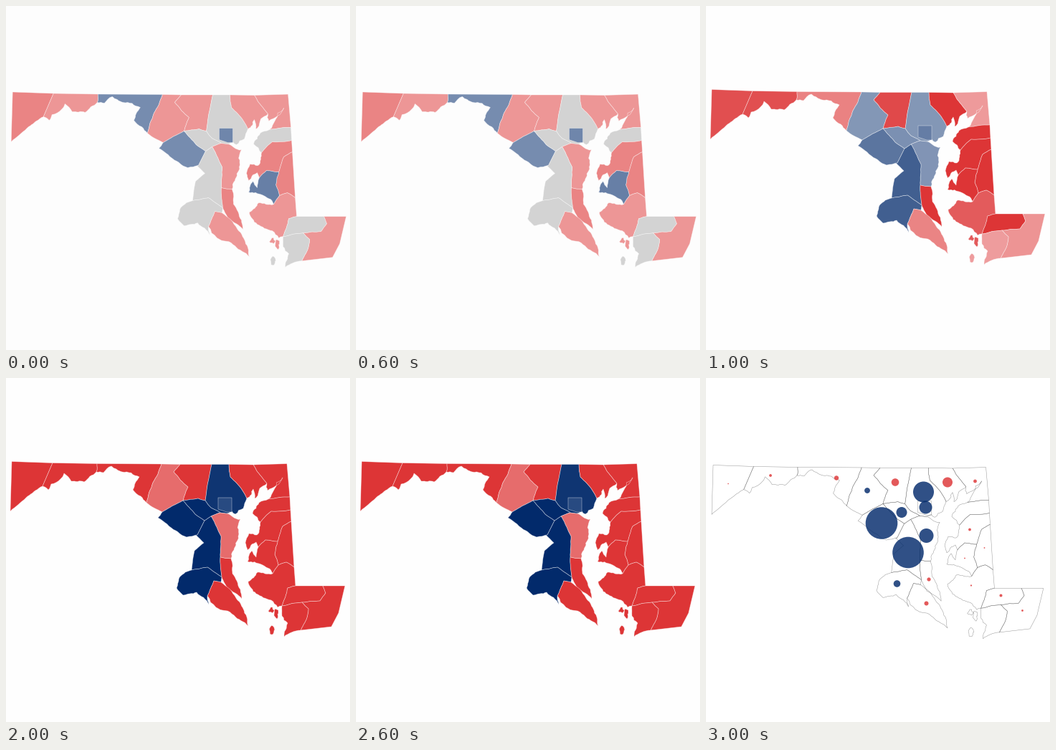
These frames come from a looping animation (480x480 px, 4000 ms). A matplotlib script:

```python
import random

import matplotlib.pyplot as plt
import numpy as np
from matplotlib.animation import FuncAnimation
from matplotlib.patches import Circle, Polygon

SIZE, DPI = 480, 100
RED, NAVY = np.array([221, 53, 54]) / 255, np.array([2, 42, 107]) / 255
GREY = (.828, .828, .828)
BORDER, RIVER, BAY = .04, .1, .15
random.seed(11)
arcs = {}


def fractal(a, b, rough):
    """Split a segment at jittered midpoints until the pieces are short."""
    d = b - a
    if not rough or np.hypot(*d) < 4:
        return [b]
    mid = (a + b) / 2 + random.uniform(-rough, rough) * np.array([d[1], -d[0]])
    return fractal(a, mid, rough) + fractal(mid, b, rough)


def arc(name, *xy, rough=BORDER):
    keys = np.array(xy, float).reshape(-1, 2)
    points = [keys[0]]
    for a, b in zip(keys, keys[1:]):
        points += fractal(a, b, rough)
    arcs[name] = points


def isle(name, x, y, w, h):
    arcs[name] = [np.array([x + w * r * np.cos(t), y + h * r * np.sin(t)])
                  for t in np.linspace(0, 2 * np.pi, 12) for r in [random.uniform(.6, 1.2)]]


def ring(names):
    """Join arcs into one outline; a leading minus walks an arc backwards."""
    points = []
    for name in names.split():
        points += arcs[name[1:]][::-1] if name[0] == "-" else arcs[name]
    return np.array(points)


def shade(lead):
    """Red for a positive lead, blue for a negative one, grey for a tie."""
    if lead == 0:
        return GREY
    return 1 - abs(lead) * (1 - (RED if lead > 0 else NAVY))


# West
arc("gar_west", 8, 116.5, 6, 186, rough=0)
arc("gar_river", 6, 186, 28, 167, 41, 157, 51, 151, rough=.06)
arc("gar_all", 65, 118.5, 51, 151, rough=0)
arc("all_river", 51, 151, 59, 156, 63, 148, 76, 141, 81, 133, 91, 144, 109, 145, 126, 131, rough=RIVER)
arc("all_was", 127, 119.5, 126, 131, rough=RIVER)
arc("was_river", 126, 131, 136, 132, 147, 123, 162, 131, 186, 138, 177, 156, 188, 165, 196, 174, rough=RIVER)
arc("was_fre", 217, 120, 212, 134, 205, 146, 196, 174)
arc("fre_river", 196, 174, 218, 187)
arc("fre_mon", 218, 187, 247, 171, rough=.02)
arc("fre_car", 243, 120.5, 234, 131, 254, 152, 247, 171)

# Centre
arc("car_how", 247, 171, 268, 168, 278, 171)
arc("car_bal", 287, 120.5, 281.5, 147, 278, 171, rough=.01)
arc("bal_how", 278, 171, 286, 181, 299, 188)
arc("bal_har", 311, 120.5, 313, 138, 330, 157, 336, 168)
arc("bal_shore", 336, 168, 331, 182, 320, 190, 315, 186, 307, 189, rough=BAY)
arc("city", 296, 167, 315, 167, 315, 187, 308, 187, 296, 183, rough=0)
arc("how_mon", 247, 171, 264, 190, 277, 199)
arc("how_pg", 286, 193, 277, 199)
arc("how_aa", 299, 188, 286, 193)
arc("mon_pg", 277, 199, 267, 219, rough=0)
arc("mon_river", 267, 219, 252, 222, 237, 213, 212, 195, 218, 187, rough=.07)
arc("aa_pg", 286, 193, 294, 208, 300, 221, 299, 250)
arc("aa_shore", 314, 252, 318, 240, 324, 221, 327, 197, 307, 189, rough=BAY)
arc("cal_aa", 299, 250, 314, 252)
arc("pg_cal", 299, 250, 301, 278)
arc("pg_cha", 259, 268, 281, 264, 301, 278)
arc("pg_river", 259, 268, 263, 241, 276, 230, 265, 219, rough=.02)

# South
arc("cha_stm", 300, 285, 290, 283, 281, 304)
arc("cha_river", 281, 304, 283, 316, 266, 299, 247, 303, 238, 293, 243, 277, 259, 268, rough=RIVER)
arc("stm_shore", 281, 304, 293, 320, 318, 331, 338, 346, 331, 322, 321, 307, 300, 285, rough=RIVER)
arc("cal_shore", 301, 278, 309, 294, 329, 308, 327, 295, 316, 273, 314, 252, rough=.07)

# Upper shore
arc("har_shore", 336, 168, 345, 155, 347, 168, 354, 154, 364, 147, rough=BAY)
arc("har_cec", 345, 121, 364, 147)
arc("cec_shore", 364, 147, 365, 157, 386, 139, 374, 156, 366, 169, rough=BAY)
arc("cec_ken", 366, 169, 396, 166)
arc("cec_east", 396, 166, 392, 119.6, rough=0)
arc("ken_qa", 397, 184, 370, 186, 355, 201)
arc("ken_shore", 355, 201, 344, 189, 353, 174, 366, 169, rough=BAY)
arc("qa_car", 398, 200, 386, 207, 379, 228)
arc("qa_tal", 379, 228, 362, 226, 352, 236)
arc("qa_shore", 352, 236, 349, 229, 337, 240, 334, 230, 339, 217, 350, 219, 355, 201, rough=BAY)

# Lower shore
arc("car_tal", 379, 228, 375, 246, 380, 261)
arc("car_dor", 380, 261, 391, 257, 402, 264)
arc("tal_dor", 380, 261, 372, 273)
arc("tal_shore", 372, 273, 356, 260, 337, 256, 343, 241, 349, 250, 352, 236, rough=BAY)
arc("dor_wic", 404, 290, 393, 293, 385, 318)
arc("dor_shore", 385, 318, 379, 320, 370, 310, 349, 301, 338, 284, 351, 271, 372, 273, rough=BAY)
arc("wic_som", 385, 318, 413, 313)
arc("wic_wor", 413, 313, 438, 311, 446, 300, 442, 290)
arc("wor_coast", 473, 290, 464, 328, 454, 347, 411, 352, rough=0)
arc("som_wor", 413, 313, 422, 322, 419, 337, 411, 352)
arc("som_shore", 411, 352, 388, 361, 393, 342, 385, 332, 385, 318, rough=BAY)
isle("isle_n", 370, 324, 4, 4)
isle("isle_e", 377, 329, 3, 8)
isle("isle_s", 371, 352, 3.5, 6)

# outline, then the lead in each of the three shaded maps
COUNTIES = [
    ("gar_west gar_river -gar_all", .61, .87, 1),
    ("gar_all all_river -all_was", .52, .87, 1),
    ("all_was was_river -was_fre", -.54, .62, 1),
    ("was_fre fre_river fre_mon -fre_car", .52, -.49, .73),
    ("fre_car car_how -car_bal", .52, .9, 1),
    ("car_bal bal_how -bal_shore -bal_har", 0, -.49, -.95),
    ("city", -.57, -.61, -.85),
    ("bal_har har_shore -har_cec", .52, 1, 1),
    ("har_cec cec_shore cec_ken cec_east", .52, .5, 1),
    ("cec_ken ken_qa ken_shore", 0, 1, 1),
    ("-ken_qa qa_car qa_tal qa_shore", .61, 1, 1),
    ("qa_car car_tal car_dor", .61, 1, 1),
    ("-qa_tal car_tal tal_dor tal_shore", -.6, 1, 1),
    ("-tal_dor car_dor dor_wic dor_shore", .52, .81, 1),
    ("dor_wic wic_som wic_wor", 0, 1, 1),
    ("wic_wor wor_coast -som_wor", .52, .53, 1),
    ("wic_som som_wor som_shore", 0, .49, 1),
    ("fre_mon how_mon mon_pg mon_river", -.54, -.65, -1),
    ("car_how bal_how how_aa how_pg -how_mon", 0, -.52, -1),
    ("how_aa aa_pg cal_aa aa_shore", .52, -.5, .73),
    ("-how_pg aa_pg pg_cal -pg_cha pg_river -mon_pg", 0, -.75, -1),
    ("-cal_aa pg_cal cal_shore", .61, 1, 1),
    ("pg_cha cha_stm cha_river", 0, -.75, -1),
    ("cha_stm stm_shore", .52, .61, 1),
    ("isle_n", .52, .81, 1),
    ("isle_e", .52, .81, 1),
    ("isle_s", 0, .49, 1),
]

# centre and radius of each vote bubble
BLUE_DOTS = [(225, 157, 3.9), (303.5, 159, 14.5), (306.5, 180.5, 9), (273, 187.5, 7.5),
             (245, 202.5, 22.3), (282, 243.5, 21.8), (307.5, 220, 10), (266.5, 287, 4.8)]
RED_DOTS = [(31, 147.5, .8), (90, 136, 1.9), (182, 139.5, 3.2), (264, 145.5, 5.3),
            (337, 145.5, 7), (375.5, 144, 2.4), (311, 281, 2.6), (307.5, 314.5, 3),
            (368, 211.5, 1.9), (388.5, 237, .9), (361, 251.5, .9), (370, 289.5, 1.1),
            (411.5, 303.5, 2), (441.5, 324.5, 1.4)]

# map origin and scale in each view
VIEWS = [((9.2, 120), 1.001), ((8, 116.5), 1), ((8, 116.5), 1), ((10, 121.5), .991)]
BACKS = ["#fdfdfd", "#fefefe", "#fefefe", "#ffffff"]

fig = plt.figure(figsize=(SIZE / DPI, SIZE / DPI), dpi=DPI)
ax = fig.add_axes([0, 0, 1, 1])
ax.set(xlim=(0, SIZE), ylim=(SIZE, 0))
ax.axis("off")

counties = []
for names, *leads in COUNTIES:
    outline = ring(names)
    counties.append((ax.add_patch(Polygon(outline, joinstyle="round")), outline, leads))

dots = [ax.add_patch(Circle((x, y), r, fc=color, ec="none", alpha=.82, zorder=3))
        for group, color in ((BLUE_DOTS, NAVY), (RED_DOTS, RED)) for x, y, r in group]


def draw(frame):
    origin, scale = VIEWS[frame]
    bubbles = frame == len(VIEWS) - 1
    fig.set_facecolor(BACKS[frame])
    for patch, outline, leads in counties:
        patch.set_xy((outline - arcs["gar_west"][0]) * scale + origin)
        patch.set_facecolor("none" if bubbles else shade(leads[frame]))
        patch.set_edgecolor((.3, .3, .3, .6) if bubbles else (1, 1, 1, .5))
        patch.set_linewidth(.35 if bubbles else .5)
    for dot in dots:
        dot.set_visible(bubbles)
    return [patch for patch, *_ in counties] + dots


anim = FuncAnimation(fig, draw, frames=len(VIEWS), interval=1000, repeat=True, repeat_delay=0)
plt.show()
```
